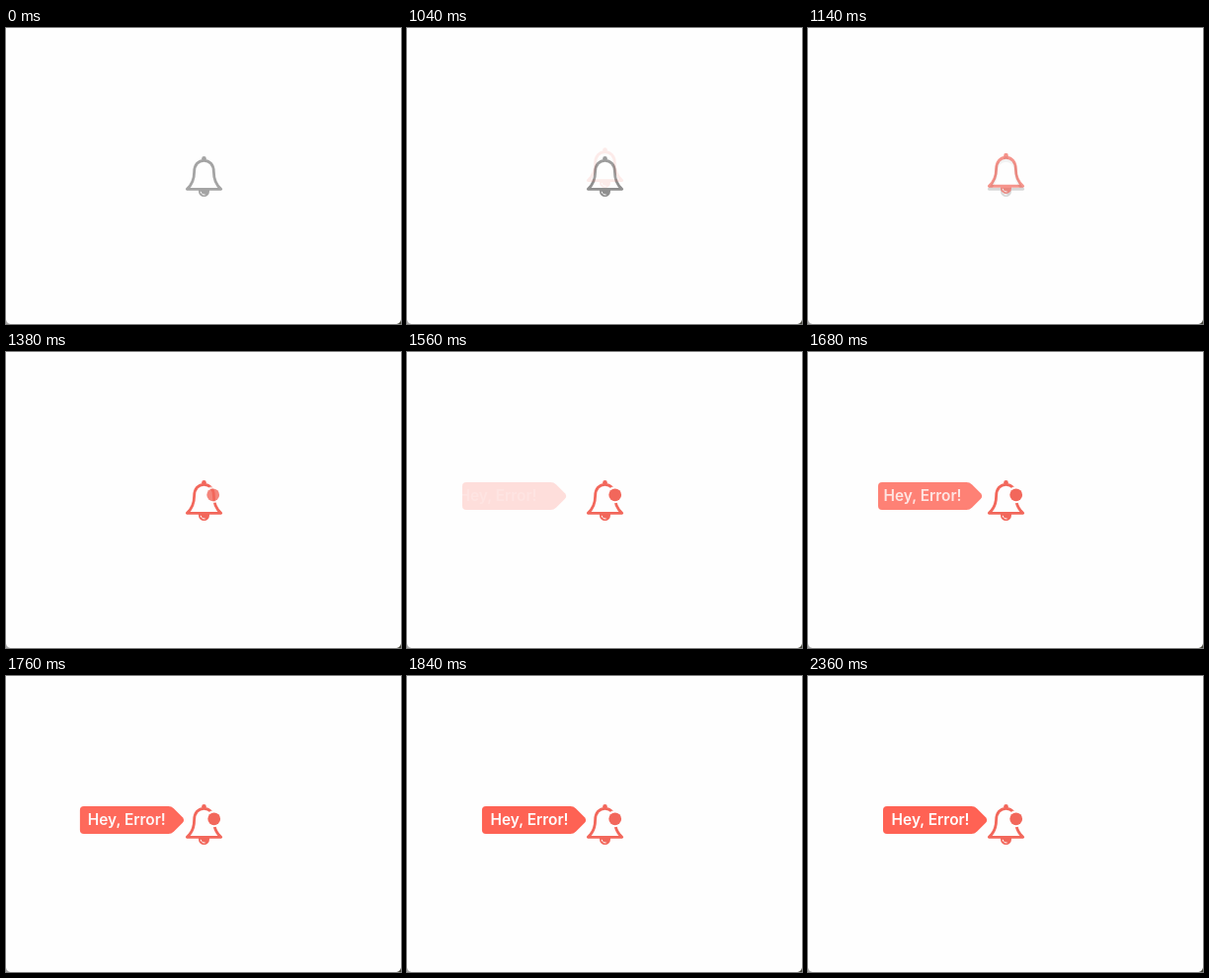
These frames come from a looping animation (400x300 px, 4360 ms). An HTML page:

```html
<!DOCTYPE html>
<html lang="en">
<head>
<meta charset="utf-8">
<title>Bell notification</title>
<style>
  html, body { margin: 0; width: 100%; height: 100%; overflow: hidden; background: #fefefe; }
  svg { display: block; width: 100vw; height: 100vh; }
  text { font: 600 15.4px Inter, "Open Sans", sans-serif; fill: #fff; }
</style>
</head>
<body>
<svg viewBox="0 0 400 300">
  <defs>
    <g id="bell">
      <path d="M183.3 163.3C188.4 158.8 190.6 153.5 190.6 146C190.6 138.3 195 134.3 200.5 134.3S210.4 138.3 210.4 146C210.4 153.5 212.6 158.8 217.7 163.3Z"
        fill="#fefefe" stroke="currentColor" stroke-width="2.8" stroke-linejoin="round"/>
      <circle cx="200.5" cy="132.2" r="2.3" fill="currentColor"/>
      <path d="M195 164V165.5A5.5 5.5 0 0 0 206 165.5V164Z" fill="currentColor"/>
      <path d="M197.2 165.8A3.6 3.6 0 0 0 201.6 168.9" fill="none" stroke="#fefefe" stroke-width="1"/>
    </g>
  </defs>
  <path d="M0 295.5Q.6 299.4 4.5 300H0Z" fill="#a8a8a8"/>
  <path d="M400 295.5Q399.4 299.4 395.5 300H400Z" fill="#45453a"/>
  <use id="idle" href="#bell"/>
  <use id="alert" href="#bell" color="#f2675b"/>
  <g id="badge">
    <circle cx="210.7" cy="144.8" r="8.5" fill="#fefefe"/>
    <circle cx="210.7" cy="144.8" r="6.4" fill="#f2675b"/>
  </g>
  <g id="label">
    <path d="M80 132H165.5Q168.8 132 171 134.2L180 143.2Q182.4 146 180 148.8L171 157.8Q168.8 160 165.5 160H80Q76 160 76 156V136Q76 132 80 132Z" fill="#ff6254"/>
    <text id="message" x="84.6" y="151.2">Hey, Error!</text>
  </g>
</svg>
<script>
  const LOOP = 4360, STEP = 20, DURATION = 350;
  const byId = id => document.getElementById(id);
  const [idle, alert, badge, label, message] =
    ["idle", "alert", "badge", "label", "message"].map(byId);

  // Share of the way still to go, cubic ease-out
  const remaining = (t, start) =>
    (1 - Math.min(1, Math.max(0, (t - start) / DURATION))) ** 3;

  function enter(el, rest, dx, dy) {
    el.setAttribute("transform", `translate(${dx * rest} ${dy * rest})`);
    el.setAttribute("opacity", 1 - rest);
  }

  function draw(t) {
    const bellRest = remaining(t, 1025);
    const labelRest = remaining(t, 1535);
    idle.setAttribute("color", bellRest < 1 ? "#808080" : "#a4a4a4");
    idle.setAttribute("opacity", bellRest);
    enter(alert, bellRest, 0, -10);
    enter(badge, remaining(t, 1235), -5, 0);
    enter(label, labelRest, -25, 0);
    enter(message, labelRest, -15, 0);
  }

  const origin = performance.now();
  function tick() {
    const t = (performance.now() - origin) % LOOP;
    draw(Math.floor(t / STEP) * STEP);
    requestAnimationFrame(tick);
  }
  tick();
</script>
</body>
</html>
```
